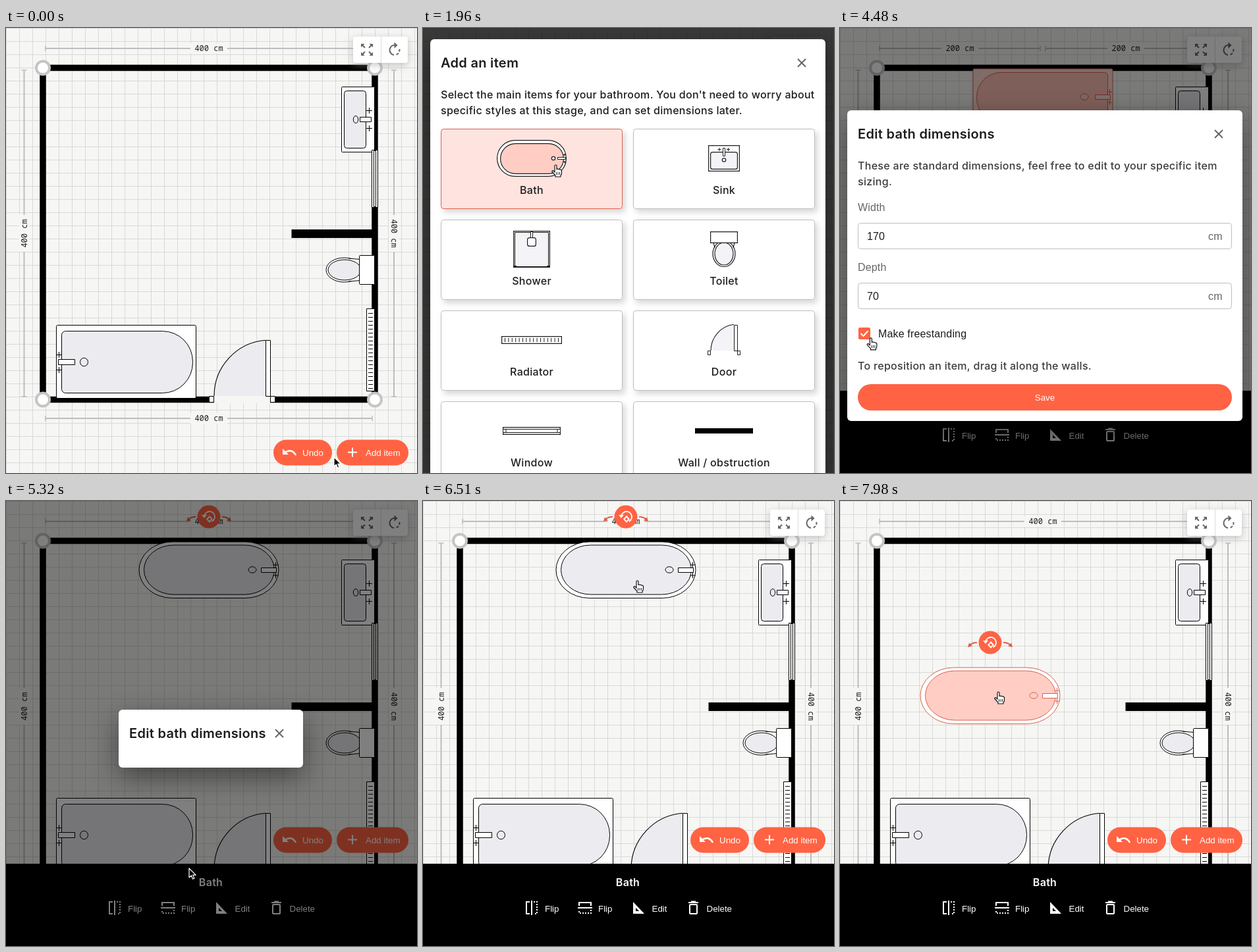
These frames come from a looping animation (624x676 px, 8000 ms). An HTML page with a canvas:

```html
<!DOCTYPE html>
<html lang="en">
<head>
<meta charset="utf-8">
<title>Bathroom planner</title>
<style>
html, body { margin: 0; width: 100%; height: 100%; overflow: hidden; background: #f6f6f4; }
canvas { display: block; }
</style>
</head>
<body>
<canvas id="stage" width="624" height="676"></canvas>
<script>
const W = 624, H = 676, LOOP = 8000, STEP = 70, CELL = 20;
const BG = '#f6f6f4', ORANGE = '#ff6343', PALE = '#ebebf0', INK = '#1d1d1d';
const SANS = '"Liberation Sans", Arial, sans-serif';
const TITLE = 'Inter, "Open Sans", sans-serif';
const MONO = '"Noto Sans Mono", "DejaVu Sans Mono", monospace';

const main = document.getElementById('stage').getContext('2d');
const sheet = document.createElement('canvas');
sheet.width = W;
sheet.height = H;
const sheetCtx = sheet.getContext('2d');
let g = main;

const clamp = v => Math.max(0, Math.min(1, v));
const smooth = (a, b, t) => { const p = clamp((t - a) / (b - a)); return p * p * (3 - 2 * p); };

// ---- drawing helpers ----
function paint(fill, stroke, lw = 1) {
  if (fill) { g.fillStyle = fill; g.fill(); }
  if (stroke) { g.strokeStyle = stroke; g.lineWidth = lw; g.stroke(); }
}
function box(x1, y1, x2, y2, r, fill, stroke, lw = 1) {
  const i = stroke ? lw / 2 : 0;
  g.beginPath();
  g.roundRect(x1 + i, y1 + i, x2 - x1 - 2 * i, y2 - y1 - 2 * i, r);
  paint(fill, stroke, lw);
}
function oval(x, y, rx, ry, fill, stroke, lw) {
  g.beginPath();
  g.ellipse(x, y, rx, ry, 0, 0, 7);
  paint(fill, stroke, lw);
}
function line(color, lw, ...p) {
  g.beginPath();
  for (let i = 0; i < p.length; i += 2) g.lineTo(p[i], p[i + 1]);
  paint(null, color, lw);
}
function poly(fill, ...p) {
  g.beginPath();
  for (let i = 0; i < p.length; i += 2) g.lineTo(p[i], p[i + 1]);
  g.closePath();
  paint(fill);
}
function plus(x, y, s, color, lw = 1) {
  line(color, lw, x - s, y, x + s, y);
  line(color, lw, x, y - s, x, y + s);
}
function text(s, x, y, font, size, color, align = 'left', weight = 400) {
  g.font = `${weight} ${size}px ${font}`;
  g.letterSpacing = size < 16 ? '0px' : font === TITLE ? '0.3px' : '0.15px';
  g.fillStyle = color;
  g.textAlign = align;
  g.fillText(s, x, y + size * 0.36);
}
function shadow(color, blur, dx, dy, draw) {
  g.save();
  g.shadowColor = color;
  g.shadowBlur = blur;
  g.shadowOffsetX = dx;
  g.shadowOffsetY = dy;
  draw();
  g.restore();
}
function at(x, y, draw, turn = 0) {
  g.save();
  g.translate(x, y);
  g.rotate(turn);
  draw();
  g.restore();
}
// Dims the page, then lays a translucent sheet over it
function layer(alpha, dim, draw) {
  if (alpha <= 0) return;
  box(0, 0, W, H, 0, `rgba(0,0,0,${dim * alpha})`);
  sheetCtx.clearRect(0, 0, W, H);
  g = sheetCtx;
  draw();
  g = main;
  g.globalAlpha = alpha;
  g.drawImage(sheet, 0, 0);
  g.globalAlpha = 1;
}

// ---- pointer ----
const moves = [
  [70, 210, 592, 656], [350, 490, 566, 649], [1540, 1960, 202, 208], [3290, 3780, 37, 467],
  [4480, 4970, 278, 558], [5880, 6510, 326, 121], [6930, 7770, 246, 312], [7980, 7980, 241, 290]
];
const progress = (a, b, t) => smooth(a - STEP, b, t);

function pointer(t) {
  let x = 498, y = 652;
  for (const [a, b, nx, ny] of moves) {
    if (t < a) break;
    const p = progress(a, b, t);
    x += (nx - x) * p;
    y += (ny - y) * p;
  }
  let kind = 'hand';
  if (t < 140) kind = 'arrow';
  else if (t >= 2520 && t < 3430) kind = 'beam';
  else if (t >= 3430 && t < 5320) kind = y > 541 || (y > 450 && x < 190) ? 'hand' : 'arrow';
  else if (t >= 5320 && t < 6510) kind = y < 148 ? 'hand' : 'arrow';
  return { x, y, kind };
}

const handPath = new Path2D('M-2 9V1.5Q-2 0-.5 0T1 1.5V6.5Q2 5.6 3.5 6.5 5 6 6.2 7.2 8 7 8.5 8.5V12Q8.5 15 7 16V18H-1V16L-6 10.5Q-6.5 8.5-4.5 8.6L-2 11Z');
const arrowPath = new Path2D('M0 0V14L3.3 11 5.6 16.2 7.9 15.2 5.7 10.2H10.2Z');

function drawPointer({ x, y, kind }) {
  at(x, y, () => {
    g.lineJoin = 'round';
    if (kind === 'beam') {
      for (const [c, w] of [['#fff', 2.4], ['#111', 1.2]]) {
        line(c, w, 0, -7, 0, 7);
        line(c, w, -3, -8, 0, -7, 3, -8);
        line(c, w, -3, 8, 0, 7, 3, 8);
      }
      return;
    }
    const hand = kind === 'hand', path = hand ? handPath : arrowPath;
    g.fillStyle = hand ? '#fff' : '#000';
    g.strokeStyle = hand ? '#111' : '#fff';
    g.lineWidth = 1.2;
    g.fill(path);
    g.stroke(path);
    if (hand) for (const i of [0, 2.5, 5]) line('#111', 0.9, i + 0.5, 11, i + 0.5, 15);
  });
}

// ---- floor plan ----
function measure(a, b, label) {
  const c = '#bdbdc1', m = (a + b) / 2;
  line(c, 2, a, 0, b, 0);
  line(c, 1.5, a, -4, a, 4);
  line(c, 1.5, b, -4, b, 4);
  box(m - 28, -8, m + 28, 8, 0, BG);
  text(label, m, 0, MONO, 12, '#222', 'center');
}

function doorLeaf(x1, x2, x3, top, foot, s, fill, ink) {
  const r = x3 - x1, end = Math.PI * 1.5 - Math.asin((x3 - x2) / r);
  g.beginPath();
  g.moveTo(x2, foot);
  g.lineTo(x1, foot);
  g.arc(x3, foot, r, Math.PI, end);
  g.closePath();
  paint(fill);
  g.beginPath();
  g.arc(x3, foot, r, Math.PI, end);
  paint(null, ink, 1.1);
  box(x2, top, x3 + 1, foot + 1, 0, '#fff', ink);
  box(x1 - s, foot, x1, foot + s + 2, 0, '#fff', ink);
  box(x3, foot, x3 + s, foot + s + 2, 0, '#fff', ink);
}

function room(split) {
  g.fillStyle = BG;
  g.fillRect(0, 0, W, H);
  g.fillStyle = '#d9d9d7';
  for (let x = 0; x < W; x += CELL) g.fillRect(x, 0, 1, H);
  for (let y = 0; y < H; y += CELL) g.fillRect(0, y, W, 1);

  at(0, 31, () => {
    if (split) { measure(60, 304, '200 cm'); measure(312, 556, '200 cm'); }
    else measure(60, 556, '400 cm');
  });
  at(0, 593, () => measure(60, 556, '400 cm'));
  at(27.5, 312, () => measure(-248, 248, '400 cm'), -Math.PI / 2);
  at(589, 312, () => measure(-248, 248, '400 cm'), Math.PI / 2);

  g.strokeStyle = '#000';
  g.lineWidth = 9.5;
  g.strokeRect(56, 60.5, 504, 504);
  box(433.5, 306, 556, 319, 0, '#000');
  box(316, 559, 401, 570, 0, BG);
  for (const x of [56, 560]) for (const y of [60.5, 564.5]) oval(x, y, 10, 10, '#fff', '#c5c5c5', 4);

  // basin
  box(509, 89, 560, 189, 1, '#fff', '#000');
  box(513, 95, 547, 183, 4, PALE, '#000');
  oval(531, 139, 3.7, 5.5, PALE, '#000');
  box(537, 135, 555, 143, 0, '#fff', '#000');
  plus(551.5, 125.5, 4.5, '#000');
  plus(551.5, 152.5, 4.5, '#000');

  // window
  box(555, 185, 565, 273, 0, '#fff', '#000');
  box(558, 186, 562, 272, 0, '#fff', '#000');

  // toilet
  oval(513.5, 367.5, 27.5, 18.5, '#fff', '#000');
  poly('#fff', 522, 351, 538, 351, 538, 384, 522, 384);
  line('#000', 1, 520, 350, 538, 351.5);
  line('#000', 1, 520, 385, 538, 383.5);
  oval(514, 367.5, 25, 15.5, PALE, '#000');
  box(536, 345, 560, 390, 1, '#fff', '#000');

  // radiator
  box(547, 426, 560, 552, 0, '#fff', '#000');
  for (let y = 433; y < 548; y += 6) line('#000', 1, 550, y + 0.5, 557, y + 0.5);

  // corner tub
  box(76, 451, 289, 563, 2, '#fff', '#000');
  box(84, 460, 284, 555, [6, 46, 46, 6], PALE, '#000');
  box(79, 503, 105, 512, 0, '#fff', '#000');
  oval(118.5, 507.5, 6, 6.3, PALE, '#000');
  plus(80.5, 496.5, 4.5, '#000');
  plus(80.5, 519.5, 4.5, '#000');

  doorLeaf(316, 394, 401, 474, 559, 8, PALE, '#000');
}

// New tub, drawn around its centre
function tub(x, y, free, picked) {
  const ink = picked ? '#d9604a' : '#000', fill = picked ? '#ffcdc4' : PALE;
  at(x, y, () => {
    if (free) {
      box(-106.5, -43.5, 106.5, 43, { x: 51, y: 43 }, '#fff', ink);
      box(-99, -38.5, 100, 37.5, { x: 45, y: 37.5 }, fill, ink);
    } else {
      box(-106.5, -43.5, 106.5, 45, 2, '#ffd9d2', ink);
      box(-101, -38, 99, 39, [37, 5, 5, 37], '#ffbfb3', ink);
    }
    oval(free ? 66 : 63, -0.5, 6, 4.7, fill, ink);
    box(79, -4, 103, 4, 0, picked && !free ? '#ffd9d2' : '#fff', ink);
    plus(101.5, -8, 4, ink);
    plus(101.5, 8, 4, ink);
  });
}

function turner(x, y) {
  at(x, y, () => {
    for (const s of [-1, 1]) {
      g.beginPath();
      g.moveTo(s * 20, 0);
      g.quadraticCurveTo(s * 27, 0, s * 31, 4);
      paint(null, '#d9604a', 2);
      poly('#d9604a', s * 34, 7, s * 27, 5.5, s * 32, 0.5);
    }
    oval(0, 0, 17.5, 17.5, ORANGE);
    g.beginPath();
    g.arc(1, 0, 8, -2.9, 1.1);
    paint(null, '#fff', 1.8);
    poly('#fff', -11, -3, -3, -3, -7, 2);
    poly('#fff', 1, -2, 6, 3.5, 1, 9, -4, 3.5);
    poly(ORANGE, 1, 1, 3.5, 3.5, 1, 6, -1.5, 3.5);
  });
}

function tools() {
  shadow('rgba(150,150,150,.55)', 12, 0, 3, () => box(527, 13, 610, 53, 4, '#fff'));
  line('#ddd', 1, 569.5, 13, 569.5, 53);
  const c = '#666';
  at(548, 33, () => {
    for (const a of [-1, 1]) for (const b of [-1, 1]) {
      line(c, 2, a * 3, b * 3, a * 8, b * 8);
      poly(c, a * 9, b * 9, a * 3.5, b * 9, a * 9, b * 3.5);
    }
  });
  at(590, 33.5, () => {
    g.beginPath();
    g.arc(0, 0, 7.5, 1.7, 4.9);
    paint(null, c, 2);
    g.setLineDash([4, 2.4]);
    g.beginPath();
    g.arc(0, 0, 7.5, -0.2, 1.5);
    paint(null, c, 2);
    g.setLineDash([]);
    poly(c, -0.5, -12, 4.5, -7.3, -0.5, -2.6);
  });
}

function buttons(y, hot) {
  box(406, y - 19.5, 495, y + 19.5, 19.5, ORANGE);
  box(502, y - 19.5, 611, y + 19.5, 19.5, hot ? '#f0583a' : ORANGE);
  g.beginPath();
  g.moveTo(423, y);
  g.quadraticCurveTo(434, y - 7, 440, y + 4);
  paint(null, '#fff', 2.6);
  poly('#fff', 420, y - 6, 420, y + 3, 429, y + 3);
  plus(526, y - 0.5, 7, '#fff', 2);
  text('Undo', 450, y, SANS, 13.33, '#fff');
  text('Add item', 546, y, SANS, 13.33, '#fff');
}

function flipIcon() {
  line('#fff', 2, -3, -9, -8, -9, -8, 9, -3, 9);
  line('#fff', 2, 0, -11, 0, 11);
  g.setLineDash([2, 2]);
  line('#fff', 2, 3, -9, 8, -9, 8, 9, 3, 9);
  g.setLineDash([]);
}

function bar(top) {
  if (top >= H) return;
  at(0, top, () => {
    box(0, 0, W, 200, 0, '#000');
    text('Bath', 311, 28, TITLE, 16, '#fff', 'center', 600);
    at(165, 67, flipIcon);
    at(246, 67, flipIcon, Math.PI / 2);
    poly('#fff', 319, 58, 319, 76, 336, 76);
    poly('#000', 323, 67, 323, 72, 328, 72);
    box(404, 61, 417, 77, 1, null, '#fff', 2);
    line('#fff', 2, 403, 59, 418, 59);
    line('#fff', 2, 407, 57.5, 414, 57.5);
    [['Flip', 185], ['Flip', 266], ['Edit', 347.5], ['Delete', 430.5]]
      .forEach(([s, x]) => text(s, x, 68, SANS, 13.33, '#fff'));
  });
}

// ---- dialogs ----
function dialog(x1, y1, x2, y2, title) {
  shadow('rgba(0,0,0,.45)', 40, 0, 14, () => box(x1, y1, x2, y2, 6, '#fff'));
  text(title, x1 + 16, y1 + 36, TITLE, 20, INK, 'left', 600);
  at(x2 - 36, y1 + 36, () => {
    line('#666', 2, -6, -6, 6, 6);
    line('#666', 2, -6, 6, 6, -6);
  });
}

const items = [
  ['Bath', fill => {
    box(112, 170, 218, 226, 28, '#fff', INK, 1.2);
    box(117, 175, 214, 222, 23.5, fill, INK, 1.2);
    oval(198, 198, 2.7, 2.7, '#fff', INK, 1.2);
    box(204, 196, 217, 200, 0, '#fff', INK);
    plus(215, 192.5, 2, INK);
    plus(215, 203.5, 2, INK);
  }],
  ['Sink', fill => {
    box(433, 178, 481, 218, 0, '#fff', INK, 1.2);
    box(436, 188, 478, 215, 3, fill, INK, 1.2);
    box(455, 182, 459, 195, 0, '#fff', INK);
    oval(457, 200.5, 2.7, 2.7, '#fff', INK, 1.2);
    plus(450, 184.5, 2.5, INK);
    plus(463.5, 184.5, 2.5, INK);
  }],
  ['Shower', fill => {
    box(137, 308, 193, 364, 0, '#fff', INK, 1.2);
    box(139, 310, 191, 363, 0, fill, INK);
    box(163, 309, 167, 319, 0, '#fff', INK);
    box(158, 318, 172, 332, 3, '#fff', INK, 1.2);
    box(138, 361, 142, 364, 0, INK);
    box(188, 361, 192, 364, 0, INK);
  }],
  ['Toilet', fill => {
    oval(457, 343, 17, 19.5, '#fff', INK, 1.2);
    line(INK, 1.2, 441, 326, 443, 334);
    line(INK, 1.2, 473, 326, 471, 334);
    oval(457, 343, 14, 17, fill, INK, 1.2);
    box(436, 309, 478, 327, 0, '#fff', INK, 1.2);
  }],
  ['Radiator', () => {
    box(119, 468, 211, 480, 0, '#fff', INK, 1.2);
    for (let i = 0; i < 16; i++) line(INK, 1, 124.5 + i * 5.4, 471, 124.5 + i * 5.4, 477);
  }],
  ['Door', fill => doorLeaf(437, 472, 477, 451, 490, 5, fill, INK)],
  ['Window', () => {
    box(121, 606, 209, 618, 0, '#fff', INK, 1.2);
    box(121, 609, 209, 615, 0, '#fff', INK);
    line(INK, 1, 126, 609, 126, 615);
    line(INK, 1, 204, 609, 204, 615);
  }],
  ['Wall / obstruction', () => box(413, 608, 501, 616, 0, '#000')]
];

function picker(t, cur) {
  dialog(11, 17, 611, 720, 'Add an item');
  text("Select the main items for your bathroom. You don't need to worry about", 27, 101, TITLE, 16, INK, 'left', 500);
  text('specific styles at this stage, and can set dimensions later.', 27, 125, TITLE, 16, INK, 'left', 500);
  items.forEach(([name, icon], i) => {
    const x = 27 + (i % 2) * 292, y = 153 + (i >> 1) * 138;
    const hot = cur.x > x && cur.x < x + 276 && cur.y > y && cur.y < y + 122;
    shadow('rgba(0,0,0,.16)', 10, 4, 5, () => box(x, y, x + 276, y + 122, 4, hot ? '#ffe3de' : '#fff'));
    box(x, y, x + 276, y + 122, 4, null, hot ? '#e0634f' : '#bdbdbd');
    icon(hot ? '#ffcdc4' : '#f3f3f8');
    text(name, x + 138, y + 93, TITLE, 16, INK, 'center', 500);
  });
  if (t >= 2310) oval(202, 208.5, 33, 33, 'rgba(200,80,60,.14)');
}

function field(y, label, value, focus, hot, caret) {
  const c = focus ? '#e0553a' : '#666';
  text(label, 27, y - 23.5, SANS, 16, c);
  box(27, y, 595, y + 40, 4, '#fff', focus ? c : hot ? '#222' : '#bdbdbd', focus ? 2 : 1);
  text(value, 41, y + 20, SANS, 16, INK);
  text('cm', 559, y + 20, SANS, 16, '#666');
  if (caret) line('#000', 1, 67.5, y + 11, 67.5, y + 29);
  if (focus || hot) {
    box(537, y + 8, 551, y + 31, 3, '#ececec');
    poly('#444', 540.5, y + 16, 547.5, y + 16, 544, y + 12);
    poly('#444', 540.5, y + 24, 547.5, y + 24, 544, y + 28);
  }
}

function editor(t, cur) {
  if (t >= 5250) {
    dialog(171, 317, 451, 405, 'Edit bath dimensions');
    return;
  }
  const ticked = t >= 3920, over = y => cur.y > y && cur.y < y + 40;
  dialog(11, 125, 611, 597, 'Edit bath dimensions');
  const note = (s, y) => text(s, 27, y, TITLE, 16, '#3c3c3c', 'left', 500);
  note('These are standard dimensions, feel free to edit to your specific item', 209);
  note('sizing.', 233);
  field(296, 'Width', '170', !ticked, over(296), !ticked && (t < 3080 || t >= 3570));
  field(387, 'Depth', '70', false, over(387));
  if (ticked) {
    box(28, 455, 46, 473, 2, ORANGE);
    line('#fff', 2, 31.5, 464, 35.5, 468, 42.5, 460);
  } else box(28, 455, 46, 473, 2, '#fff', '#5c5c5c', 2);
  text('Make freestanding', 58, 464, SANS, 16, INK);
  note('To reposition an item, drag it along the walls.', 513);
  box(27, 541, 595, 581, 20, over(541) ? '#f0583a' : ORANGE);
  text('Save', 311, 561, SANS, 13.33, '#fff', 'center');
}

// ---- one picture for time t ----
function draw(t) {
  const cur = pointer(t);
  const placed = t >= 2450, free = t >= 5180;
  const slide = smooth(2520, 2800, t);
  const drag = progress(6930, 7770, t);
  const x = 308 - 80 * drag, y = 105 + 191 * drag;

  room(placed && !free);
  if (placed) tub(x, y, free, !free || t >= 6720);
  if (free) turner(x, y - 81);
  tools();
  buttons(645 - 130 * slide, t >= 140 && t < 1120);
  bar(H - 125 * slide);

  if (t >= 770 && t < 2730) layer(smooth(700, 1120, t) * (1 - smooth(2380, 2660, t)), 0.76, () => picker(t, cur));
  if (t >= 2450 && t < 5530) layer(smooth(2380, 2700, t) * (1 - smooth(5320, 5530, t)), 0.5, () => editor(t, cur));
  drawPointer(cur);
}

function tick(now) {
  draw(Math.floor((now % LOOP) / STEP) * STEP);
  requestAnimationFrame(tick);
}
requestAnimationFrame(tick);
</script>
</body>
</html>
```
